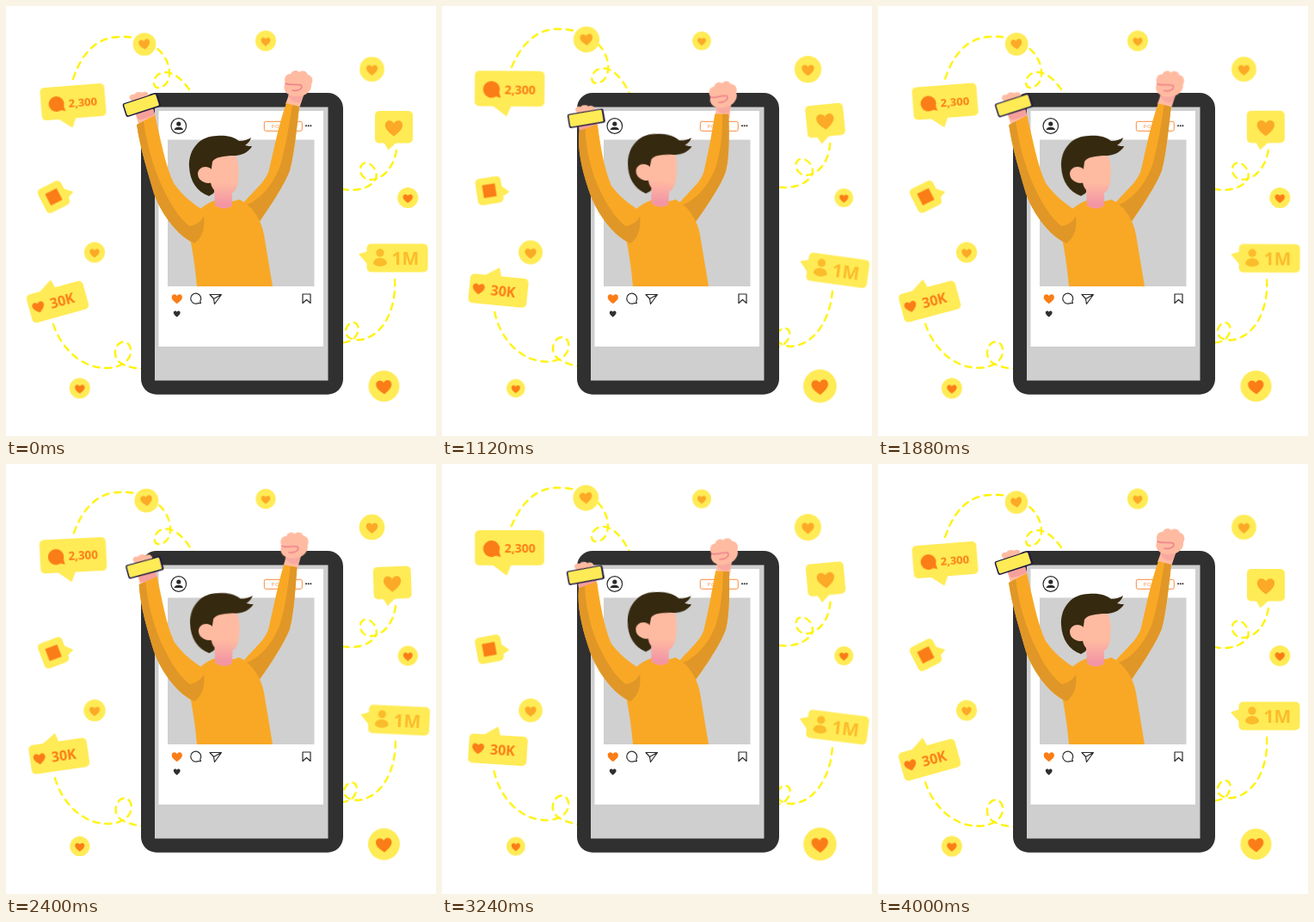
Recreate the animation shown at these times as an HTML page without scripts. Size 500x500 px, loop 4.04 s.

```html
<!DOCTYPE html>
<html lang="en">
<head>
<meta charset="utf-8">
<title>Social cheer</title>
<style>
html, body { margin: 0; width: 100%; height: 100%; overflow: hidden; background: #fff; }
svg { display: block; width: 100vw; height: 100vh; }
text { font-family: "Open Sans", "Noto Sans", sans-serif; font-weight: 700; }

/* two swings of 2 s, then one 40 ms rest */
.m, .d { animation: sway 4040ms ease-in-out infinite; }
/* resets keep nested parts from inheriting their parent's move */
.m { --o: 0 0; --x: 0px; --y: 0px; --r: 0deg; --s: 1; transform-origin: var(--o); }
.d { animation-name: bend; d: var(--a); }
@keyframes sway {
  0%, 49.505%, 99.01%, 100% { transform: translate(0px, 0px) rotate(0deg) scale(1); }
  24.752%, 74.257% { transform: translate(var(--x), var(--y)) rotate(var(--r)) scale(var(--s)); }
}
@keyframes bend {
  0%, 49.505%, 99.01%, 100% { d: var(--a); }
  24.752%, 74.257% { d: var(--b); }
}

.y { fill: #ffeb55; }
.am { fill: #fba927; }
.or { fill: #fb7d17; }
.gold { fill: #fbbc2c; }
.dash { fill: none; stroke: #fff200; stroke-width: 2.3; stroke-dasharray: 7.5 6.5; stroke-linecap: round; }
.shirt { fill: #f9a825; }
.shade { fill: #e09727; }
.skin { fill: #ffbba1; }
.hair { fill: #35290f; }
.ink { fill: none; stroke: #2b2b2b; stroke-width: 1.2; stroke-linejoin: round; }

#arm-l {
  --a: path("M152 138L173 127C180 155 185 185 195 206C205 220 216 229 230 238L229 262L219 276C195 265 178 235 172 218C164 190 156 165 152 138Z");
  --b: path("M160 145L181 138C184 160 188 188 197 209C206 221 217 230 230 238L229 262L219 276C195 265 178 235 172 218C163 192 157 168 160 145Z");
}
#shade-l {
  --a: path("M152 138L160 134C164 165 174 195 184 215C194 236 205 250 214 256C222 254 228 250 230 244C232 258 228 270 219 276C195 265 178 235 172 218C164 190 156 165 152 138Z");
  --b: path("M160 145L167 143C167 168 175 197 184 215C194 236 205 250 214 256C222 254 228 250 230 244C232 258 228 270 219 276C195 265 178 235 172 218C163 192 157 168 160 145Z");
}
#arm-r {
  --a: path("M326 113L341 117C338 145 334 178 330 191C325 206 304 238 291 256L275 230C290 213 303 203 306 190C312 165 317 138 326 113Z");
  --b: path("M317 126L333 126C334 150 334 178 330 192C326 206 305 238 291 256L275 230C290 213 303 203 305 190C311 165 314 145 317 126Z");
}
#shade-r {
  --a: path("M341 117C338 145 334 178 330 191C325 206 304 238 291 256L276 232C295 228 312 205 319 185C325 165 329 140 333 115Z");
  --b: path("M333 126C334 150 334 178 330 192C326 206 305 238 291 256L276 232C295 228 313 205 319 185C325 165 326 145 326 126Z");
}
</style>
</head>
<body>
<svg viewBox="0 0 500 500" xmlns="http://www.w3.org/2000/svg">
<defs>
  <path id="heart" d="M0 5.6C-3 3.2-6 1-6-2C-6-4-4.6-5.2-3-5.2C-1.6-5.2-.5-4.4 0-3.2C.5-4.4 1.6-5.2 3-5.2C4.6-5.2 6-4 6-2C6 1 3 3.2 0 5.6Z"/>
  <linearGradient id="face" gradientUnits="userSpaceOnUse" x1="0" y1="205" x2="0" y2="230">
    <stop offset="0" stop-color="#ffbba1"/>
    <stop offset="1" stop-color="#f396a4"/>
  </linearGradient>
</defs>

<!-- dashed trails and their bubbles -->
<g class="m" style="--o:240px 112px;--r:5.1deg">
  <path class="dash" d="M78 85C88 55 105 37 130 36C165 33 190 55 190 78C190 90 183 95 176 95C170 94 171 83 178 79C190 73 204 82 217 103"/>
  <g transform="translate(161 44.5)"><g class="m" style="--s:1.14;--x:1px;--y:1px">
    <circle class="y" r="13.3"/>
    <use class="am" href="#heart" transform="rotate(-10) scale(1.08)"/>
  </g></g>
  <g transform="translate(78 111.5) rotate(-4.5)"><g class="m" style="--s:1.085;--y:-1.5px">
    <rect class="y" x="-37.5" y="-19" width="75" height="38" rx="5"/>
    <path class="y" d="M-19 18L-3 30L2 18Z"/>
    <circle class="or" cx="-19.5" cy="1" r="9"/>
    <path class="or" d="M-16 8L-9.5 10L-11.5 3Z"/>
    <text class="or" x="-5.5" y="5.5" font-size="13">2,300</text>
  </g></g>
</g>

<g class="m" style="--o:371px 191px;--r:-5.9deg">
  <path class="dash" d="M454 168C450 190 437 202 423 202C411 201 409 186 416 183C426 180 433 194 430 201C425 211 406 219 380 210"/>
  <rect class="y" x="429" y="122" width="44" height="37.5" rx="5"/>
  <path class="y" d="M439 158L444.5 167.5L455 158Z"/>
  <use class="am" href="#heart" transform="translate(451 142) scale(1.7)"/>
</g>

<g class="m" style="--o:353px 339px;--r:8.1deg">
  <path class="dash" d="M452 318C454 350 440 383 413 388C396 390 391 379 398 371C404 364 412 370 409 379C406 389 398 393 380 391"/>
  <g transform="translate(455 293)">
    <rect class="y" x="-35.5" y="-16.5" width="71" height="33" rx="5"/>
    <path class="y" d="M-34-8L-45-4.5L-34 8Z"/>
    <circle class="gold" cx="-20" cy="-6" r="4.7"/>
    <path class="gold" d="M-28 6C-27-2-13-2-12 6C-14 11-26 11-28 6Z"/>
    <text class="gold" x="-6.5" y="7.5" font-size="21">1M</text>
  </g>
</g>

<g class="m" style="--o:187px 419px;--r:6.5deg">
  <path class="dash" d="M55 370C64 398 88 421 116 421C134 421 146 412 145 400C144 387 129 387 127 402C126 416 140 422 175 423"/>
  <g transform="translate(60 344)"><g class="m" style="--r:15.2deg;--x:-3.5px;--y:1px"><g transform="rotate(-15.5)">
    <rect class="y" x="-34" y="-17" width="68" height="34" rx="5"/>
    <path class="y" d="M-18-16L-1-27L2-16Z"/>
    <use class="or" href="#heart" transform="translate(-23 0) scale(1.15)"/>
    <text class="or" x="-9" y="5.5" font-size="16">30K</text>
  </g></g></g>
</g>

<!-- small square bubble -->
<g class="m" style="--o:78px 217px;--r:18.5deg">
  <g transform="translate(55.5 222) rotate(-27)">
    <rect class="y" x="-15" y="-15.5" width="30" height="31" rx="5"/>
    <path class="y" d="M14-4L23 5L14 9Z"/>
    <rect class="or" x="-7.5" y="-7.5" width="15" height="15"/>
  </g>
</g>

<!-- pulsing hearts -->
<g transform="translate(302 40.5)"><g class="m" style="--s:.9">
  <circle class="y" r="12"/><use class="am" href="#heart" transform="translate(0 1) scale(.92)"/>
</g></g>
<g transform="translate(425.5 73.5)"><g class="m" style="--s:1.09">
  <circle class="y" r="14.4"/><use class="am" href="#heart" transform="translate(0 1) scale(1.1)"/>
</g></g>
<g transform="translate(467.3 223)"><g class="m" style="--s:.9">
  <circle class="y" r="12"/><use class="or" href="#heart" transform="translate(0 1) scale(.95)"/>
</g></g>
<g transform="translate(103 286.5)"><g class="m" style="--s:1.17">
  <circle class="y" r="12"/><use class="am" href="#heart" transform="translate(0 1) scale(.95)"/>
</g></g>
<g transform="translate(85.8 444.5)"><g class="m" style="--s:.89">
  <circle class="y" r="12"/><use class="or" href="#heart" transform="translate(0 1) scale(.95)"/>
</g></g>
<g transform="translate(439.5 442)"><g class="m" style="--s:1.08">
  <circle class="y" r="18"/><use class="or" href="#heart" transform="translate(0 1) rotate(-4) scale(1.5)"/>
</g></g>

<!-- tablet with post -->
<rect x="157" y="101" width="235" height="350.7" rx="18" fill="#303030"/>
<rect x="173" y="117.5" width="201.5" height="318" fill="#cfcfcf"/>
<rect x="177.5" y="122" width="191.5" height="274" fill="#fff"/>
<rect x="188" y="155.5" width="170.5" height="170.5" fill="#d0d0d0"/>
<circle class="ink" cx="200.8" cy="139.5" r="8.8"/>
<g fill="#2b2b2b">
  <circle cx="200.8" cy="137" r="2.6"/>
  <path d="M195.5 144C196 139.5 205.6 139.5 206 144Z"/>
  <circle cx="349" cy="139.3" r="1"/><circle cx="351.7" cy="139.3" r="1"/><circle cx="354.4" cy="139.3" r="1"/>
</g>
<rect x="300.3" y="134.3" width="44" height="11" rx="2" fill="#fff" stroke="#fb8a3c"/>
<text x="308.5" y="142" font-size="6" letter-spacing=".8" fill="#fb8a3c" style="font-weight:400">POST</text>
<use class="or" href="#heart" transform="translate(198.8 340.5) scale(1.02)"/>
<path class="ink" d="M226.5 345.5L225.7 343.5A6 6 0 1 0 223 345.7Z"/>
<path class="ink" d="M237 335.5H250.5L242.5 346.5L241.5 340.5ZM241.5 340.5L250.5 335.5"/>
<path class="ink" d="M345 335H354V345.5L349.5 341.5L345 345.5Z"/>
<use href="#heart" fill="#303030" transform="translate(198.7 358) scale(.65)"/>

<!-- raised fist and right arm -->
<g class="m" style="--o:334px 114px;--x:-8px;--y:14px;--r:-12deg">
  <path class="skin" d="M325 114L329 103C323 100 322 93 325 90C322 84 326 78 331 79C333 74 339 74 341 77C345 74 350 76 351 80C356 81 358 87 355 91C356 97 351 102 346 104L341 119Z"/>
  <path d="M328 103C334 106 340 105 346 104L342 112C336 113 330 110 328 103Z" fill="#f8a9a0"/>
  <path d="M325 90C330 93 337 90 343 92C346 95 341 100 333 98" fill="none" stroke="#f0868d" stroke-width="1.8" stroke-linecap="round"/>
</g>
<path id="arm-r" class="d shirt"/>
<path id="shade-r" class="d shade"/>

<!-- torso -->
<path class="shirt" d="M222 240C231 230 240 227 246 225C254 228 264 228 271 225C285 231 297 248 300 266L310 326H222C220 305 218 290 214 270Z"/>

<!-- head -->
<g class="m" style="--o:253px 237px;--y:-2px;--r:3.6deg">
  <path class="hair" d="M236 221C222 216 214 204 213 187C212 166 226 151 245 151C258 150 266 153 271 157C277 157 282 155 285 153C284 157 281 160 278 162C281 163 284 163 286 163C283 169 276 173 267 174L262 185L241 218Z"/>
  <path fill="url(#face)" d="M240 181C243 176 252 174 267 174C271 181 271 193 270 203C269 212 266 216 263 217L263 232C258 237 248 236 243 232L242 214C238 210 237 202 238 196Z"/>
  <path class="skin" d="M239 190C233 184 223 188 223 195C223 203 232 208 240 205Z"/>
</g>

<!-- left hand, handset, arm -->
<g class="m" style="--o:157.5px 115px;--x:10.3px;--y:16px;--r:8.8deg">
  <path class="skin" d="M146 110C141 106 145 102 149 103C152 99 157 100 158 101C162 98 167 101 166 105L170 117L174 129L154 137L149 121Z"/>
  <path d="M151 126L171 119L173 126C166 130 158 132 154 132Z" fill="#f6a09c"/>
  <g transform="translate(157.5 115) rotate(-18)">
    <rect x="-21" y="-8" width="42.5" height="16.5" rx="2.5" fill="#1d1744"/>
    <rect class="y" x="-19.5" y="-7" width="39" height="14" rx="1.5"/>
  </g>
</g>
<path id="arm-l" class="d shirt"/>
<path id="shade-l" class="d shade"/>
</svg>
</body>
</html>
```
